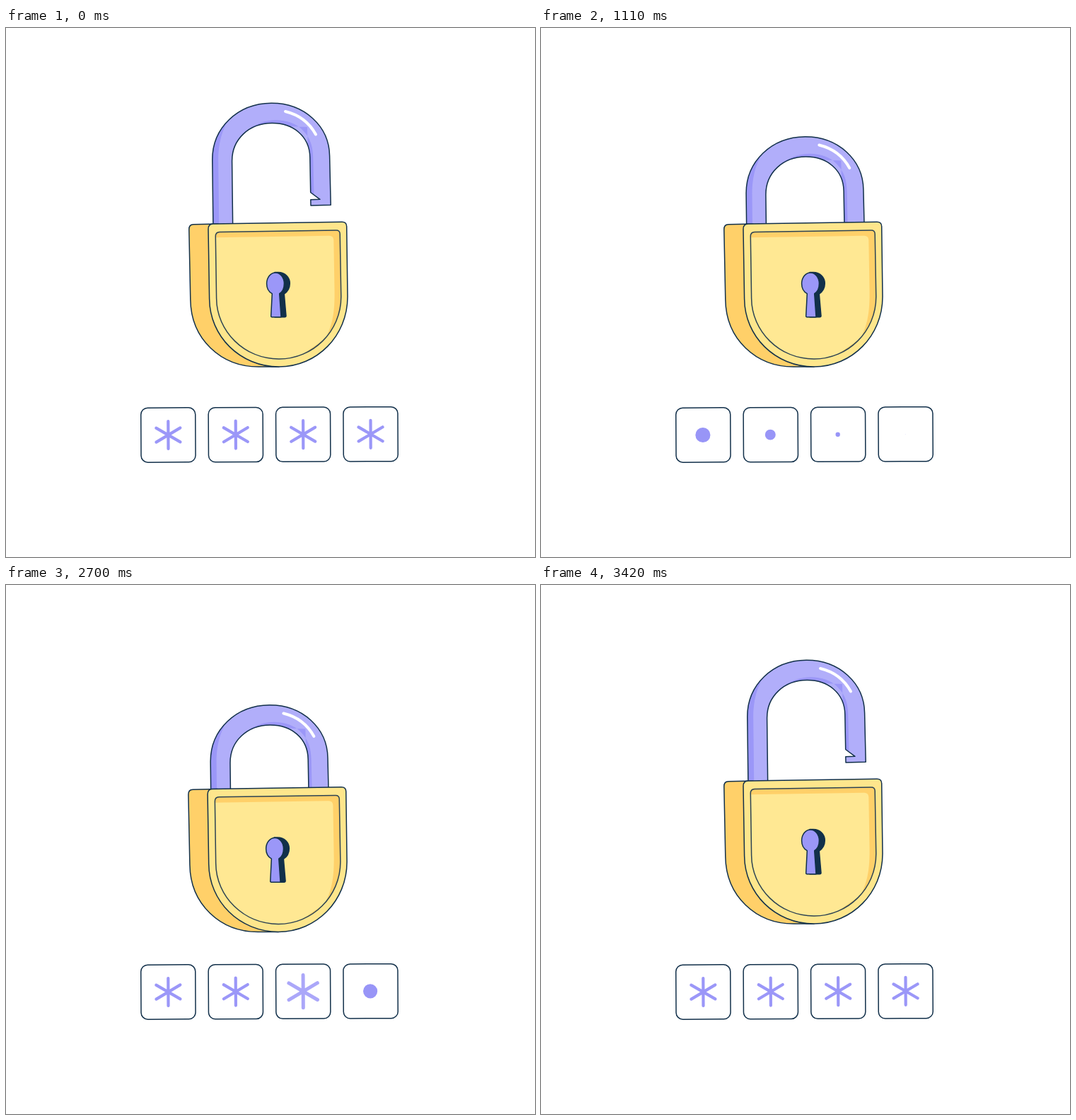
Write an HTML page that moves like this. It is 748 px wide and 748 px high and loops after 3600 ms.

```html
<!DOCTYPE html>
<html lang="en">
<head>
<meta charset="utf-8">
<title>Padlock and passcode</title>
<style>
  html, body { margin: 0; width: 100%; height: 100%; overflow: hidden; background: #fff; }
  svg { display: block; width: 100vw; height: 100vh; }
  .line { fill: none; stroke: #12304a; stroke-width: 1.5; stroke-linejoin: round; }
</style>
</head>
<body>
<svg viewBox="0 0 748 748">
  <defs>
    <path id="bow" d="M293.7 345 L291.8 187 C291.3 141 328 106.7 375 106.3 C422 106 457 139 457.6 181 L459.2 250.3 L431 251 L430.8 242.8 L444 242.3 L430.7 232.5 L429.8 183 C429.3 153 406 134.4 376 134.6 C344 134.8 319.1 157 319.6 189 L321.4 345 Z"/>
    <path id="panel" d="M296.3 294.5 Q296.3 288.6 302 288.4 L467 286 Q472 286 472.2 291 L473.8 380 C473.8 429 434 468 386 468 C337 468 297.8 429 297.6 382 Z"/>
    <clipPath id="inBow"><use href="#bow"/></clipPath>
    <clipPath id="inPanel"><use href="#panel"/></clipPath>
  </defs>

  <g id="shackle">
    <use href="#bow" fill="#b1aefa"/>
    <g clip-path="url(#inBow)" fill="#9b97f8">
      <path d="M285 345 V100 H345 C312 122 300.5 150 300.2 187 L302 345 Z"/>
      <path d="M340 146 C365 124 402 127 419 144 C431 156 434 168 434.3 184 L435.4 235 L428 236 L426 140 L376 138 Z"/>
    </g>
    <path d="M395 118 Q424 125 438 150.5" fill="none" stroke="#fff" stroke-width="4" stroke-linecap="round"/>
    <use href="#bow" class="line"/>
  </g>

  <g id="body">
    <path class="line" style="fill:#ffd069" d="M258.8 285 Q258.6 278 265 277.8 L300 277 L386 479 H357 C304 479 261.5 440 260.8 384 Z"/>
    <path class="line" style="fill:#fee68c" d="M286 284.5 Q286 277.3 292.5 277.1 L475 274.3 Q481.5 274.2 481.7 280.5 L483 380 C483 435 440 479 386 479 C331 479 288 436 287.6 383 Z"/>
    <use href="#panel" fill="#ffd069"/>
    <path clip-path="url(#inPanel)" fill="#ffe893" d="M290 296.3 L457 293.8 Q463 293.8 463.3 300 L464.6 375 C464.6 405 461 420 452 439 L400 475 H290 Z"/>
    <use href="#panel" class="line" style="stroke:#2c4353"/>
    <path class="line" style="fill:#12304a" d="M385 345.5 C395 345.5 401.3 353 401.3 361 C401.3 368 398 373 393.3 376 L396 407 Q396 408.7 394 408.7 H380 V345.5 Z"/>
    <path class="line" style="fill:#9b97f8" d="M376.3 375.6 C371.5 373 368.6 367.5 368.6 361.5 C368.6 353 374 346 381 346 C388 346 393.4 353 393.4 361.5 C393.4 367.5 391 373 386.7 375.6 L389 408.7 H376 Q374.6 408.7 374.7 407.3 Z"/>
  </g>

  <g id="cells"></g>
</svg>
<script>
const LOOP = 3600, STEP = 30;
const byId = id => document.getElementById(id);
const sine = p => (1 - Math.cos(Math.PI * p)) / 2;
const cubic = p => p < .5 ? 4 * p ** 3 : 1 - 4 * (1 - p) ** 3;

// Value at time t along a flat list of time, value pairs
function track(t, keys, ease = sine) {
  if (t <= keys[0]) return keys[1];
  for (let i = 2; i < keys.length; i += 2) {
    if (t < keys[i]) {
      const p = (t - keys[i - 2]) / (keys[i] - keys[i - 2]);
      return keys[i - 1] + (keys[i + 1] - keys[i - 1]) * ease(p);
    }
  }
  return keys[keys.length - 1];
}

const bodyY = [390, 0, 570, -13, 750, 11.5, 1050, 0, 2520, 0, 2760, 12.2, 3060, -13, 3390, 0];
const bowY = [390, 0, 570, -28, 750, 64, 1050, 47.5, 2520, 47.5, 2800, 67, 2880, 67, 3150, -24, 3420, 0];

byId('cells').innerHTML = [0, 1, 2, 3].map(i => `
  <g transform="translate(${229.4 + 95.4 * i} ${575.5 - .4 * i}) rotate(-.3)">
    <rect class="line" x="-38.5" y="-38.5" width="77" height="77" rx="9.5"/>
    <circle cx="-.5" fill="#9895f7"/>
    <path d="M0 -19.5V19.5M-17 -10L17 10M-17 10L17 -10" fill="none"
      stroke="#9b97f8" stroke-width="4.2" stroke-linecap="round"/>
  </g>`).join('');
const cells = [...byId('cells').children];

function drawCell(cell, i, t) {
  const [, dot, star] = cell.children;
  const entering = t > 1800, back = t - 90 * i;
  const scale = entering
    ? track(back, [2440, 0, 2515, 1.19, 2600, 1])
    : track(t - 120 * i, [420, 1, 585, 1.19, 750, 0]);
  star.setAttribute('transform', `scale(${scale})`);
  star.setAttribute('opacity', entering ? track(back, [2440, .4, 2575, 1], cubic) : 1);

  const pulse = track(t - 120 * i, [700, 0, 1170, 11, 1290, 11, 1690, .5]);
  const regrow = track(t - 160 * i, [1790, 0, 2260, 10.6]);
  dot.setAttribute('r', Math.max(pulse, regrow) * track(back, [2425, 1, 2470, 0]));
}

function draw(now) {
  const t = Math.floor(now % LOOP / STEP) * STEP;
  const by = track(t, bodyY, cubic), sy = track(t, bowY, cubic);
  const bx = -.08 * Math.max(by, 0);
  const sx = bx - 1.7 * Math.min(Math.max(sy / 47.5, 0), 1);
  byId('body').setAttribute('transform', `translate(${bx} ${by})`);
  byId('shackle').setAttribute('transform', `translate(${sx} ${sy})`);
  cells.forEach((cell, i) => drawCell(cell, i, t));
}

const start = performance.now();
function tick() {
  draw(performance.now() - start);
  requestAnimationFrame(tick);
}
tick();
</script>
</body>
</html>
```
